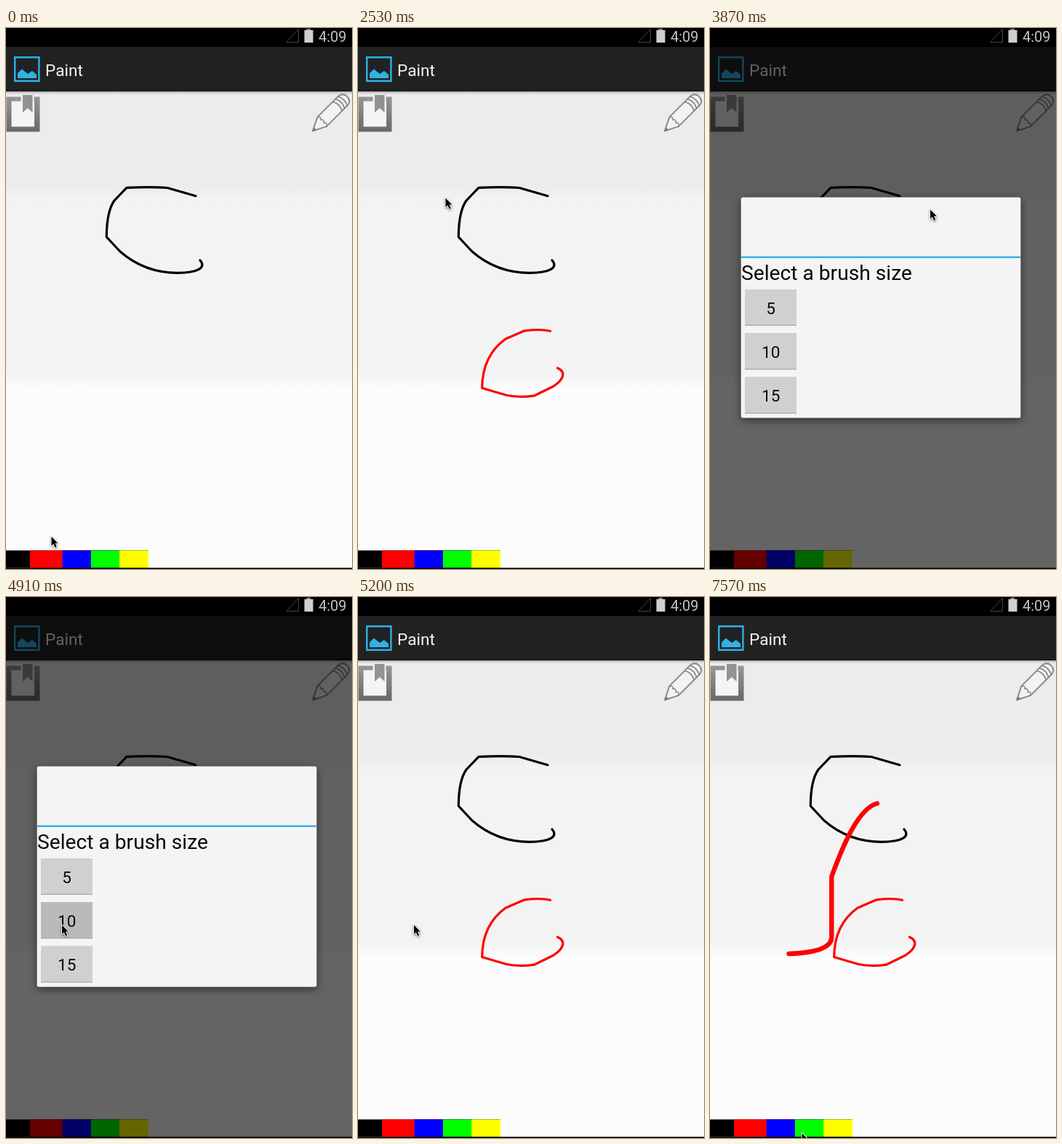
An HTML page with a canvas for the animation above (8000 ms loop, 476x743 px).

```html
<!DOCTYPE html>
<html lang="en">
<head>
<meta charset="utf-8">
<title>Paint</title>
<style>
html, body { margin: 0; width: 100%; height: 100%; overflow: hidden; background: #fbfbfb; }
canvas { display: block; width: 476px; height: 743px; }
svg { display: none; }
</style>
</head>
<body>
<canvas id="stage" width="476" height="743"></canvas>
<svg><path id="probe" d="M0 0"/></svg>
<script>
const W = 476, H = 743, LOOP = 8000, TICK = 148.5, LAST = 51;
const ctx = document.getElementById('stage').getContext('2d');
const probe = document.getElementById('probe');
const FONT = 'Roboto, "Noto Sans", sans-serif';
const OPEN = 25, PRESS = 33, CLOSE = 34;

const clamp = v => Math.max(0, Math.min(1, v));
const linear = p => p;
const easeOut = p => 1 - (1 - p) ** 3;

function curve(d) {
  const el = probe.cloneNode();
  el.setAttribute('d', d);
  return { path: new Path2D(d), length: el.getTotalLength(), at: p => el.getPointAtLength(p * el.getTotalLength()) };
}

// One stretch of pointer travel, between two ticks
const leg = (from, to, d, ease = easeOut) => ({
  from, ...curve(d), progress: k => ease(clamp((k - from) / (to - from)))
});

const blackArc = curve('M261 230.7L222 219.5Q200 218 166 219.3L149 237Q138.5 252 138.3 287' +
  'L157 307C180 327 208 336.3 236 336.3S276 329 267 319');
const redArc = leg(8, 12.2, 'M264.5 416.3Q252 413 229 415.8L203 427Q171 450 170.7 494.5' +
  'L204 504.3Q220 508 242 505.2L269 492C284 482 286 472 274.5 467', linear);
const thickArc = leg(42, 46, 'M230 283.5C205 290 184 338 167.3 384V468Q166 488 108.5 490', linear);
const travel = [
  leg(0, 3, 'M62 698Q72 722 53 727'),
  leg(4, 8, 'M53 727Q90 590 264.5 416.3'),
  redArc,
  leg(14, 17, 'M274.5 467C200 330 50 232 120 233'),
  leg(17, 23, 'M120 233Q260 160 433 128'),
  leg(OPEN, 32, 'M433 128Q250 300 76.5 450'),
  leg(35, 42, 'M76.5 450C300 480 330 300 230 283.5'),
  thickArc,
  leg(46, LAST, 'M108.5 490C115 600 160 700 126 736')
];

function box(x, y, w, h, color) {
  ctx.fillStyle = color;
  ctx.fillRect(x, y, w, h);
}

function shade(y, h, ...stops) {
  const g = ctx.createLinearGradient(0, y, 0, y + h);
  stops.forEach((c, i) => g.addColorStop(i / (stops.length - 1), c));
  return g;
}

function paint(path, fill, stroke, width = 1) {
  if (fill) { ctx.fillStyle = fill; ctx.fill(path); }
  if (stroke) { ctx.strokeStyle = stroke; ctx.lineWidth = width; ctx.stroke(path); }
}

const shape = (d, ...look) => paint(new Path2D(d), ...look);

function label(text, x, y, size, color, align = 'left') {
  ctx.font = `${size}px ${FONT}`;
  ctx.textAlign = align;
  ctx.fillStyle = color;
  ctx.fillText(text, x, y);
}

function brush(line, color, width, part = 1) {
  if (part <= 0) return;
  ctx.save();
  ctx.lineCap = ctx.lineJoin = 'round';
  if (part < 1) ctx.setLineDash([part * line.length, line.length * 2]);
  paint(line.path, null, color, width);
  ctx.restore();
}

function paper() {
  box(0, 0, W, H, '#fcfcfc');
  box(0, 0, W, 496, shade(472, 24, '#f3f3f3', '#fcfcfc'));
  box(0, 0, W, 237, shade(217, 20, '#ececec', '#f3f3f3'));
}

function statusBar() {
  box(0, 0, W, 26, '#000');
  shape('M385.5 19.5L402.5 1.5V19.5Z', null, '#454545');
  box(413.5, 1, 5.5, 3, '#8c8c8c');
  box(410.5, 3, 12, 17, '#cfcfcf');
  label('4:09', 430, 19, 20, '#c4c4c4');
}

function actionBar() {
  box(0, 26, W, 61, '#222');
  box(0, 85, W, 2, '#181818');
  box(0, 87, W, 5, shade(87, 5, 'rgba(0,0,0,.35)', 'rgba(0,0,0,.08)', 'rgba(0,0,0,0)'));
  shape('M12.2 40.2H45.4V72.8H12.2Z', '#1f2325', '#2fb2e5', 2.4);
  shape('M16 69V62L22 56.5L30 63L36 59L42 64V69Z', '#2fb2e5');
  label('Paint', 54, 66, 22.6, '#f4f4f4');
}

function saveIcon() {
  box(0.5, 94.5, 46, 48, shade(94, 48, '#969696', '#696969'));
  box(7.5, 100.5, 31.5, 35, '#f4f4f4');
  box(20.5, 92, 18, 12, '#f0f0f0');
  shape('M23 92H36.5V116L29.8 110L23 116Z', '#929292');
}

function pencilIcon() {
  ctx.save();
  ctx.translate(422, 141.5);
  ctx.rotate(-Math.PI / 4);
  ctx.lineJoin = 'round';
  shape('M0 0L18 -9H59Q67 -8 67 0Q67 8 59 9H18Z', '#f3f3f3', '#888', 2);
  shape('M0 0L5 -2.5V2.5Z', '#777');
  shape('M18 -9Q23 -5 18.5 -3Q23 0 18.5 3Q23 5 18 9', null, '#888', 1.5);
  for (let x = 48; x < 60; x += 5) shape(`M${x} -9q5 9 0 18`, null, '#888', 1.8);
  ctx.restore();
}

function swatches() {
  ['#000', '#f00', '#00f', '#0f0', '#ff0'].forEach((c, i) => {
    const x = i && 39.3 * i - 1;
    box(i === 1 ? 33 : x, 717.5, 196 - x, 24, c);
  });
  box(196, 717, W - 196, 24, '#fcfcfc');
  box(0, 741.4, W, 1.6, '#000');
}

function dialog(alpha, scale, pressed) {
  const panel = new Path2D();
  panel.roundRect(42.6, 232.6, 384.8, 302.8, 2.5);
  const outside = new Path2D(panel);
  outside.rect(0, 0, W, H);

  ctx.save();
  ctx.globalAlpha = alpha;
  ctx.translate(235, 384);
  ctx.scale(scale, scale);
  ctx.translate(-235, -384);

  // Keep the shadow from showing through the fading panel
  ctx.save();
  ctx.clip(outside, 'evenodd');
  ctx.shadowColor = 'rgba(0,0,0,.55)';
  ctx.shadowBlur = 12;
  ctx.shadowOffsetY = 3;
  paint(panel, '#000');
  ctx.restore();

  paint(panel, '#f4f4f4');
  box(43, 313.5, 384, 2.5, '#33b5e5');
  label('Select a brush size', 43, 345.5, 28.2, '#0a0a0a');
  for (let i = 0; i < 3; i++) {
    const y = 359 + i * 60.3;
    box(48, y, 71, 50, '#a8a8a8');
    box(48, y, 71, 48.7, pressed && i === 1 ? '#bababa' : '#d0d0d0');
    label(5 + 5 * i, 83.7, y + 33.5, 22.6, '#0a0a0a', 'center');
  }
  ctx.restore();
}

function overlay(k) {
  if (k < OPEN || k > CLOSE) return;
  const entering = k === OPEN, leaving = k === CLOSE;
  const dim = entering ? .225 : leaving ? .3 : .6;
  box(0, 26, W, H - 26, `rgba(0,0,0,${dim})`);
  if (entering) dialog(.92, .99);
  else if (leaving) dialog(.035, .91);
  else dialog(1, 1, k === PRESS);
}

function pointer(k) {
  const now = travel.findLast(t => t.from <= k);
  const tip = now.at(now.progress(k));
  const arrow = new Path2D('M.5 .5V13L3.3 10.4L5.6 15.6L7.8 14.7L5.6 9.6L9.4 9.4Z');
  ctx.save();
  ctx.translate(tip.x, tip.y);
  ctx.lineJoin = 'round';
  ctx.shadowColor = 'rgba(0,0,0,.4)';
  ctx.shadowBlur = 3;
  ctx.shadowOffsetY = 1;
  paint(arrow, '#fff', '#fff', 1.8);
  ctx.shadowColor = 'transparent';
  paint(arrow, '#000');
  ctx.restore();
}

function draw(time) {
  // The picture advances in even ticks and rests on the last one
  const k = Math.min(LAST, Math.floor(time / TICK + .08));
  paper();
  brush(blackArc, '#000', 3.2);
  brush(redArc, '#f00', 3.2, redArc.progress(k));
  brush(thickArc, '#f00', 6.4, thickArc.progress(k));
  statusBar();
  actionBar();
  saveIcon();
  pencilIcon();
  swatches();
  overlay(k);
  pointer(k);
}

function loop() {
  draw(performance.now() % LOOP);
  requestAnimationFrame(loop);
}
loop();
</script>
</body>
</html>
```
